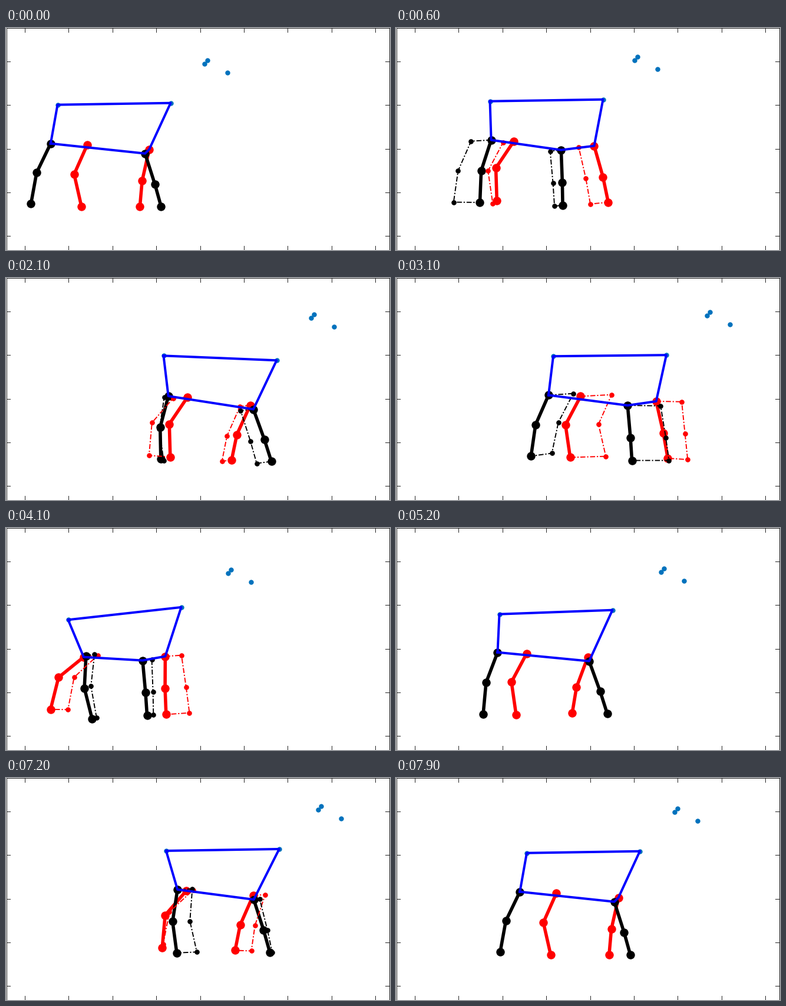
Recreate the animation shown at these times as a matplotlib script. Size 652 px wide and 378 px high, loop 8000 ms.

```python
import numpy as np
import matplotlib.pyplot as plt
from matplotlib.animation import FuncAnimation

W, H, DPI = 652, 378, 100
STEP, FRAMES = 100, 80
PX = 72 / DPI
INK, BLUE, DOT = "#262626", "#0000ff", "#0072bd"
STRIDE = 13                      # poses in one full stride

# Time, centre of the back, drop of the body, pitch of the rump.
PATH = np.array([
    (0, 184, 0, 0), (600, 256, -6, 0), (800, 268, -3, -1), (1800, 346, 9, -6),
    (2900, 412, 2, -4), (3300, 315, 4, 3), (3800, 223, 14, 8), (4300, 188, 18, 10),
    (5100, 272, 14, 2), (5700, 336, 8, 1), (6400, 359, 6, 0), (7000, 385, -8, 0),
    (7800, 318.5, -3, 0)])

# Colour, phase in degrees, hip height, shank length,
# then mean and swing of hip, knee and foot along x.
LEGS = [
    ("red", 28, 199, 56, (-57, 13), (-32, 11), (0, 14)),
    ("black", 215, 197, 54, (-88, 24), (-14, 12), (1, 13)),
    ("red", 115, 207, 44, (66, 15), (-4, 19), (0, 9)),
    ("black", 318, 214, 39, (40, 17), (10, 9), (6, 6)),
]
THIGH = 55

# A new pose starts at each of these times; the trail shows for one step.
STARTS = [0, 100, *range(200, 1900, 200), *range(2100, 3400, 200), 3600, 3800,
          *range(4100, 6000, 200), *range(6000, 7900, 200)]


def body_at(ms):
    return [np.interp(ms, PATH[:, 0], col) for col in PATH[:, 1:].T]


def torso(ms):
    """Nose, two ears, rump and withers."""
    x, drop, pitch = body_at(ms)
    nose = 203 - 15 * np.cos(2 * np.pi * (ms - 1000) / 8000)
    return np.array([(nose, 76), (nose - 34, 55), (nose - 39, 61),
                     (-96, 131 + pitch), (96, 128 - pitch)]) + (x, drop)


def leg(k, phase, hip_y, shank, hip, knee, foot):
    """Hip, knee and foot of one leg in pose k."""
    x, drop, pitch = body_at(STARTS[k])
    wave = np.cos(2 * np.pi * k / STRIDE - np.radians(phase))
    hip_dx, knee_dx, foot_dx = (mean + swing * wave for mean, swing in (hip, knee, foot))
    top = np.array([x + hip_dx, hip_y + drop - pitch * np.sign(hip[0]) / 2])
    mid = top + (knee_dx, np.sqrt(THIGH ** 2 - knee_dx ** 2))
    end = mid + (foot_dx, np.sqrt(shank ** 2 - foot_dx ** 2))
    return np.array([top, mid, end])


def hull(points):
    """Closed convex outline by monotone chain."""
    pts = sorted(map(tuple, points))

    def half(seq):
        out = []
        for p in seq:
            while len(out) > 1:
                (ax_, ay), (bx, by) = out[-2:]
                if (bx - ax_) * (p[1] - ay) - (by - ay) * (p[0] - ax_) > 0:
                    break
                out.pop()
            out.append(p)
        return out

    return np.array(half(pts)[:-1] + half(pts[::-1]))


fig = plt.figure(figsize=(W / DPI, H / DPI), dpi=DPI, facecolor="white")
ax = fig.add_axes([0, 0, 1, 1])
ax.set(xlim=(0.5, W + 0.5), ylim=(H + 0.3, 0.3))
ax.axis("off")


def rule(xs, ys):
    ax.plot(xs, ys, color=INK, lw=PX, antialiased=False, solid_capstyle="butt", zorder=1)


L, R, T, B, TICK = 1, 651, 0.8, 377.8, 6.5
rule([L, R, R, L, L], [T, T, B, B, T])
for x in np.round(32 + 74.4 * np.arange(9)):
    rule([x, x], [T, T + TICK])
    rule([x, x], [B, B - TICK])
for y in np.round(57 + 74.3 * np.arange(5)):
    rule([L, L + TICK], [y, y])
    rule([R, R - TICK], [y, y])

colors = [spec[0] for spec in LEGS]
dots, = ax.plot([], [], "o", color=DOT, ms=8.4 * PX, mew=0, zorder=2)
limbs = [ax.plot([], [], color=c, lw=5.6 * PX, marker="o", ms=14.4 * PX, mew=0,
                 solid_joinstyle="round", zorder=4 if c == "black" else 3)[0]
         for c in colors]
trails = [ax.plot([], [], color=c, lw=1.9 * PX, ls=(0, (4.5, 1.5, 1.2, 1.5)),
                  marker="o", ms=8.6 * PX, mew=0, markevery=[1, 2, 3], zorder=5)[0]
          for c in colors]
outline, = ax.plot([], [], color=BLUE, lw=4 * PX, solid_joinstyle="round", zorder=6)


def draw(frame):
    ms = frame * STEP
    k = np.searchsorted(STARTS, ms, side="right") - 1
    body = torso(STARTS[k])
    now = [leg(k, *spec[1:]) for spec in LEGS]
    past = [leg(max(k - 1, 0), *spec[1:]) for spec in LEGS]
    dots.set_data(*body.T)
    outline.set_data(*hull([*body[3:], *(limb[0] for limb in now)]).T)
    for line, trail, new, old in zip(limbs, trails, now, past):
        line.set_data(*new.T)
        trail.set_data(*np.vstack([new[:1], old, new[2:]]).T)
        trail.set_visible(k > 0 and ms == STARTS[k])
    return [dots, outline, *limbs, *trails]


anim = FuncAnimation(fig, draw, frames=FRAMES, interval=STEP,
                     init_func=lambda: draw(0), repeat=True, repeat_delay=0)
plt.show()
```
